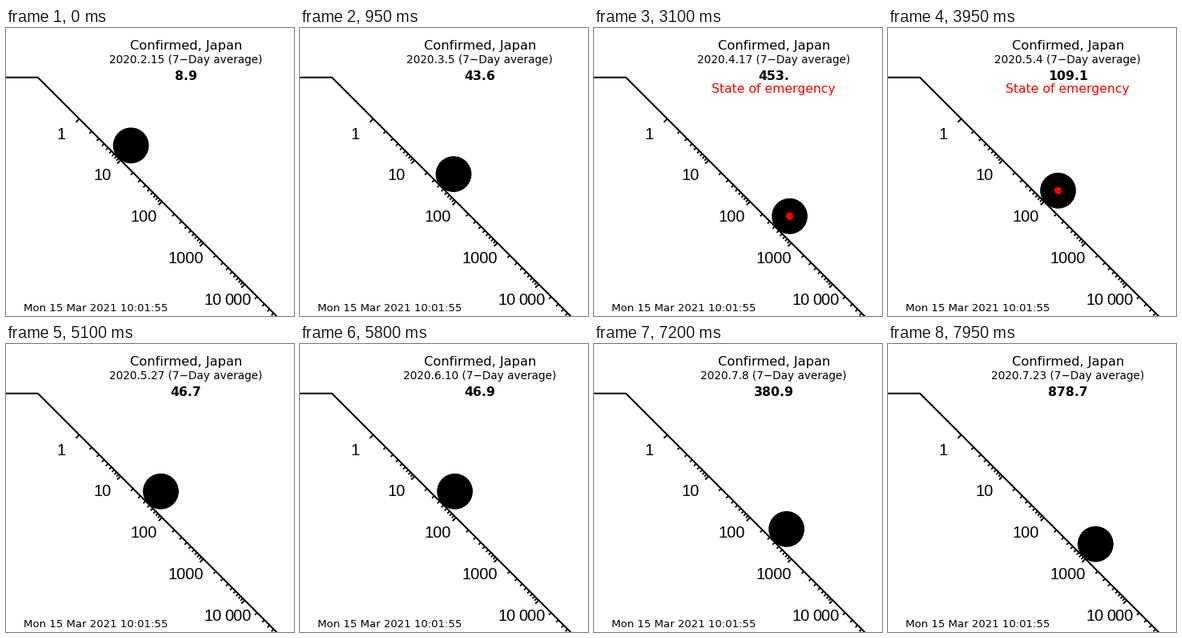
Animation, 360 px wide and 360 px high, one loop 8 s. Source, as a matplotlib script:

```python
import math
import numpy as np
import matplotlib.pyplot as plt
from matplotlib.animation import FuncAnimation
from matplotlib.patches import Circle

SIZE, DPI = 360, 100
FRAMES, INTERVAL = 160, 50        # one day per frame

CORNER = np.array([39.9, 61.8])   # where the slope begins, value 0.1
DECADE = 51.7                     # x (and y) distance per power of ten
BALL_R = 22.4
LIFT = 15.6                       # ball centre offset from the slope
MID = 224.7
EMERGENCY = range(52, 101)        # 7 April to 25 May

# Turning points of the epidemic curve: (day, average cases)
KEYS = [
    (0, 8.9), (7, 19), (12, 19), (16, 33), (20, 46.5), (30, 39),
    (37, 110.7), (44, 268), (51, 541), (55, 566), (62, 453), (68, 317),
    (73, 236), (79, 109.1), (85, 67), (92, 31), (102, 46.7), (111, 38.5),
    (119, 54.8), (129, 89.9), (136, 196), (153, 655), (159, 878.7),
]


def smooth_curve(t, x, y):
    """Cubic Hermite curve through the points x, y."""
    slope = np.gradient(y, x)
    i = np.clip(np.searchsorted(x, t, side="right") - 1, 0, len(x) - 2)
    h = x[i + 1] - x[i]
    s = (t - x[i]) / h
    start = (1 + 2 * s) * y[i] + s * h * slope[i]
    stop = (3 - 2 * s) * y[i + 1] - (1 - s) * h * slope[i + 1]
    return (1 - s) ** 2 * start + s ** 2 * stop


key_days, key_values = np.array(KEYS).T
logs = smooth_curve(np.arange(FRAMES), key_days, np.log(key_values))
averages = np.round(7 * np.exp(logs)) / 7   # whole cases over a week


def date_text(day):
    month, dom = 2, 15 + day
    for length in (29, 31, 30, 31, 30, 31):
        if dom <= length:
            break
        dom -= length
        month += 1
    return f"2020.{month}.{dom} (7\u2212Day average)"


def number_text(value):
    text = f"{value:.1f}"
    return text[:-1] if text.endswith(".0") else text


def on_slope(log):
    return CORNER + DECADE * (log + 1)


fig = plt.figure(figsize=(SIZE / DPI, SIZE / DPI), dpi=DPI, facecolor="white")
ax = fig.add_axes([0, 0, 1, 1])
ax.set_xlim(0, SIZE)
ax.set_ylim(SIZE, 0)
ax.axis("off")


def pt(px):
    return px * 72 / DPI


def label(x, y, text, px, font="DejaVu Sans", ha="center", **kw):
    return ax.text(x, y, text, fontsize=pt(px), family=font, ha=ha,
                   va="baseline", **kw)


def tick(log, length, width):
    x, y = on_slope(log)
    d = length / math.sqrt(2)
    ax.plot([x, x - d], [y, y + d], color="black", lw=pt(width),
            solid_capstyle="butt")


# Slope with its logarithmic scale
end = on_slope(6)
ax.plot([-5, CORNER[0], end[0]], [CORNER[1], CORNER[1], end[1]],
        color="black", lw=pt(2), solid_joinstyle="miter")
for k in range(5):
    tick(k, 6, 2)
    for m in range(2, 10):
        tick(k + math.log10(m), 4, 1.8)

for k, text in enumerate(("1", "10", "100", "1000")):
    label(68.6 + 52 * k, 138.8 + 51.7 * k, text, 20, "Liberation Sans")
label(247.3, 346, "10", 20, "Liberation Sans", "left")
label(273.3, 346, "000", 20, "Liberation Sans", "left")

label(MID, 27, "Confirmed, Japan", 16.2)
label(21.7, 353.6, "Mon 15 Mar 2021 10:01:55", 13.2, ha="left")
date = label(MID, 44, "", 13.6)
number = label(MID, 65, "", 15.8, weight="bold")
notice = label(MID, 81, "State of emergency", 15.6, color="red")

ball = ax.add_patch(Circle((0, 0), BALL_R, fc="black", ec="none", zorder=5))
dot = ax.add_patch(Circle((0, 0), 4.7, fc="red", ec="none", zorder=6))


def update(day):
    value = averages[day]
    x, y = on_slope(math.log10(value))
    ball.center = dot.center = (x + LIFT, y - LIFT)
    date.set_text(date_text(day))
    number.set_text(number_text(value))
    for part in (dot, notice):
        part.set_visible(day in EMERGENCY)
    return ball, dot, date, number, notice


anim = FuncAnimation(fig, update, frames=FRAMES, interval=INTERVAL,
                     repeat=True, repeat_delay=0, blit=False)
plt.show()
```
